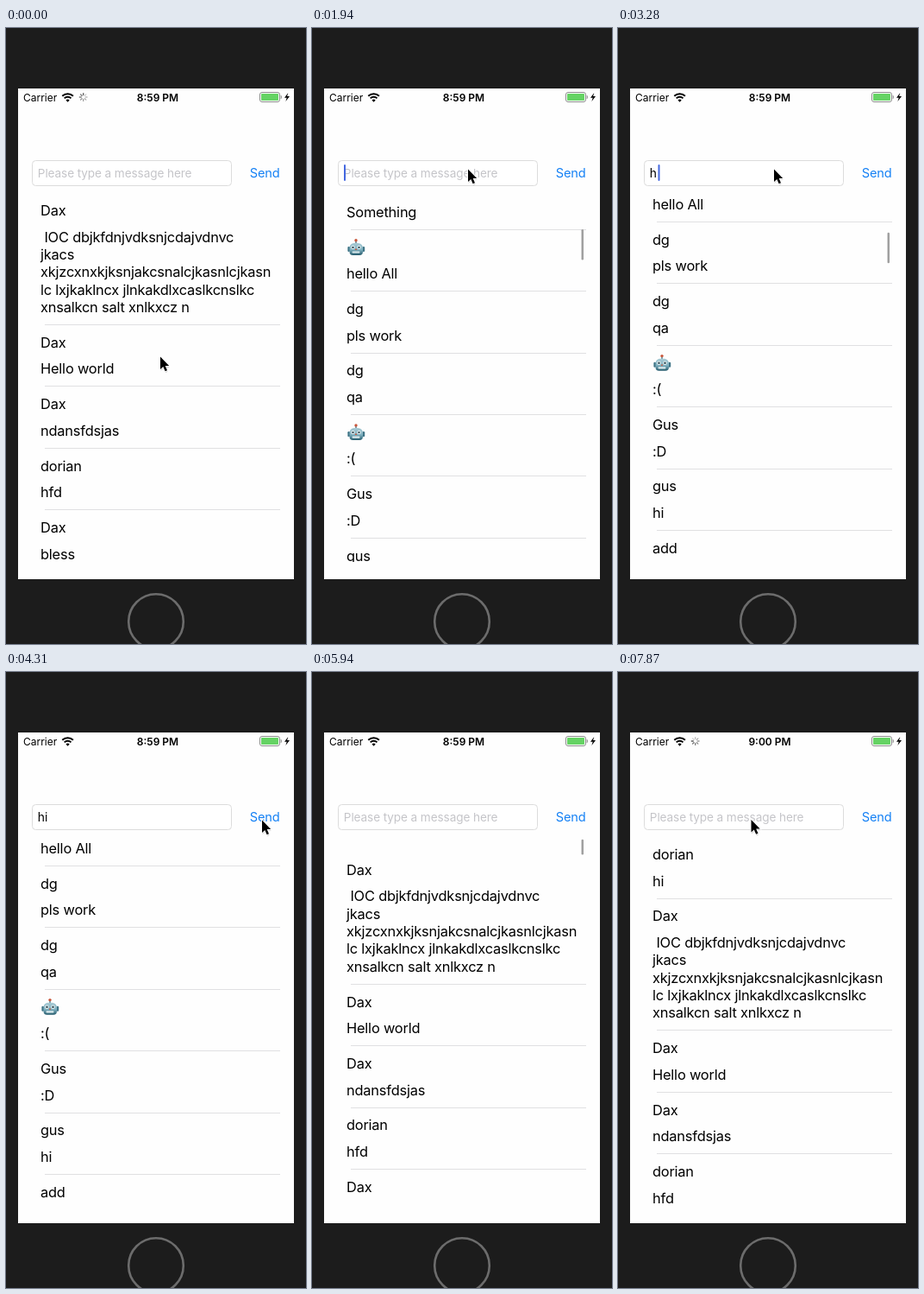
An HTML page that plays this animation: 348 px wide and 713 px high, repeating every 8 s.

```html
<!DOCTYPE html>
<html lang="en">
<head>
<meta charset="utf-8">
<title>Chat list</title>
<style>
  html, body { margin: 0; width: 100%; height: 100%; overflow: hidden; background: #1c1c1c; }
  svg { display: block; width: 348px; height: 713px; }
  text { font-family: Inter, Roboto, "Liberation Sans", sans-serif; white-space: pre; }
  .row { font-size: 16.4px; letter-spacing: -0.2px; }
  .bar { font-size: 12px; }
  .hint { font-size: 13.6px; letter-spacing: -0.1px; fill: #c5c5c9; }
  .typed { font-size: 13.8px; }
  .send { font-size: 14.6px; letter-spacing: -0.1px; fill: #1480f5; }
</style>
</head>
<body>
<svg viewBox="0 0 348 713">
  <defs>
    <clipPath id="view"><rect x="14" y="191" width="320" height="427"/></clipPath>
    <linearGradient id="steel" x2="0" y2="1">
      <stop offset="0" stop-color="#a9cbd5"/>
      <stop offset="0.55" stop-color="#7fb0bf"/>
      <stop offset="1" stop-color="#245a6c"/>
    </linearGradient>
    <g id="robot">
      <path d="M10 2v4" stroke="#5f8794" stroke-width="1.6"/>
      <circle cx="10" cy="1.8" r="1.7" fill="#c9573c"/>
      <rect x="0.4" y="9" width="2.6" height="6" rx="1.2" fill="#3f7486"/>
      <rect x="17.6" y="9" width="2.6" height="6" rx="1.2" fill="#3f7486"/>
      <path d="M7 5h6q5 1 5 6v4q0 4-4 4H6.500q-4 0-4-4v-4q0-5 4.500-6z" fill="url(#steel)"/>
      <circle cx="6.500" cy="10" r="2.200" fill="#eef6f7"/>
      <circle cx="13.500" cy="10" r="2.200" fill="#eef6f7"/>
      <circle cx="6.500" cy="10" r="1.200" fill="#2b4651"/>
      <circle cx="13.500" cy="10" r="1.200" fill="#2b4651"/>
      <path d="M10 11l1.200 2H8.800z" fill="#d9502f"/>
      <rect x="5.500" y="14.500" width="9" height="2.200" rx="1" fill="#dcebee"/>
    </g>
    <path id="tip" d="M0 0V14.500L3.300 11.400L5.600 16.800L8 15.800L5.700 10.500H10.200Z"/>
  </defs>

  <rect width="348" height="713" fill="#1c1c1c"/>
  <circle cx="174" cy="687" r="31.800" fill="none" stroke="#6c6c6c" stroke-width="2.600"/>
  <rect x="14" y="70" width="320" height="568" fill="#fefefe"/>

  <text class="bar" x="20" y="84.500">Carrier</text>
  <g fill="none" stroke="#000" stroke-width="2">
    <path d="M65.300 78.800a9 9 0 0 1 12.600 0M67.700 81.400a5.600 5.600 0 0 1 7.800 0"/>
    <path d="M71.600 85.800l-2.100-2.200a3 3 0 0 1 4.200 0z" fill="#000" stroke="none"/>
  </g>
  <g id="spin" transform="translate(89.700 80)" stroke="#5c5c5c" stroke-width="1.300" stroke-linecap="round"></g>
  <text class="bar" id="clock" x="176" y="84.500" font-weight="600" text-anchor="middle"></text>
  <rect x="294.500" y="74.500" width="23" height="11" rx="2.500" fill="none" stroke="#8d8d8d"/>
  <rect x="296" y="76" width="20" height="8" rx="1" fill="#65d364"/>
  <path d="M319 78.200q1.500 1.800 0 3.600z" fill="#8d8d8d" stroke="#8d8d8d" stroke-width="0.600"/>
  <path d="M327.300 75l-4.300 5.700h2.700l-1.300 4.300 4.600-6h-2.900z"/>

  <rect x="30.500" y="153.500" width="231" height="29" rx="4" fill="#fff" stroke="#dcdcdc"/>
  <text class="hint" id="hint" x="36.800" y="172.500">Please type a message here</text>
  <text class="typed" id="typed" x="36.800" y="172.500"></text>
  <rect id="caret" y="158" width="2" height="19" rx="1" fill="#4468e0"/>
  <text class="send" id="send" x="317.700" y="172.500" text-anchor="end">Send</text>

  <g clip-path="url(#view)">
    <g id="list" class="row"></g>
    <rect id="thumb" x="312.500" width="2.500" rx="1.250" fill="#a0a0a0"/>
  </g>

  <g id="arrow">
    <use href="#tip" x="0.500" y="1.800" opacity="0.200"/>
    <use href="#tip" stroke="#fff" stroke-width="1.800" paint-order="stroke"/>
  </g>
</svg>
<script>
const LOOP = 8000, TOP = 190.7, ROW = 71.4, LINE = 20.35;
const NS = "http://www.w3.org/2000/svg";
const $ = id => document.getElementById(id);

function add(parent, tag, attrs, text) {
  const el = document.createElementNS(NS, tag);
  for (const k in attrs) el.setAttribute(k, attrs[k]);
  if (text) el.textContent = text;
  return parent.appendChild(el);
}

// "@" stands for the robot face
const messages = [
  ["dorian", "hi"],
  ["Dax", " IOC dbjkfdnjvdksnjcdajvdnvc\njkacs\nxkjzcxnxkjksnjakcsnalcjkasnlcjkasn\nlc lxjkaklncx jlnkakdlxcaslkcnslkc\nxnsalkcn salt xnlkxcz n"],
  ["Dax", "Hello world"], ["Dax", "ndansfdsjas"], ["dorian", "hfd"],
  ["Dax", "bless"], ["Dax", "hello"], ["Dax", "Hllo world"],
  ["Dax", "fiajfsdv"], ["Dax", "hello world"], ["Dax", "dkasnida"],
  ["Dax", "Something"], ["@", "hello All"], ["dg", "pls work"],
  ["dg", "qa"], ["@", ":("], ["Gus", ":D"], ["gus", "hi"],
  ["add", "hi"], ["add", "test"]
];

const rows = messages.map(([name, body]) => {
  const g = add($("list"), "g", {});
  const lines = body.split("\n");
  if (name === "@") add(g, "use", { href: "#robot", x: 41, y: 10.5 });
  else add(g, "text", { x: 40, y: 26.3 }, name);
  lines.forEach((s, i) => add(g, "text", { x: 40, y: 56.9 + i * LINE }, s));
  const rule = add(g, "rect", { x: 45, width: 273, height: 1, fill: "#e0e0e2" });
  return { g, rule, h: ROW + (lines.length - 1) * LINE };
});

const petals = Array.from({ length: 8 }, (_, i) =>
  add($("spin"), "path", { d: "M0-2.400V-4.400", transform: `rotate(${i * 45})` }));

// The screen refreshes in bursts: [first, last, steps]
const bursts = [[0, 150, 2], [450, 450, 1], [750, 1350, 5], [1790, 1940, 2],
  [2240, 3280, 8], [3430, 3570, 2], [3870, 4310, 4], [4610, 5640, 8],
  [5790, 6830, 8], [6980, 7870, 7]];
const ticks = bursts.flatMap(([a, b, n]) =>
  Array.from({ length: n }, (_, i) => Math.floor((a + (b - a) * i / Math.max(1, n - 1)) / 10) * 10));

// Pointer path: [time, x, y]
const path = [[0, 179, 380.5], [449, 179, 380.5], [450, 179, 384], [700, 179, 384],
  [1000, 180, 320], [1350, 181, 163.5], [3750, 181, 163.5], [4020, 310, 184],
  [4160, 328, 181], [4310, 297, 171.5], [4610, 297, 171.5], [4910, 220, 245],
  [5100, 200, 300], [7200, 175, 250], [7580, 154.5, 171], [8000, 154.5, 171]];

function pointer(t) {
  const i = Math.max(1, path.findIndex(p => p[0] > t));
  const [a, b] = [path[i - 1], path[i]];
  const k = (t - a[0]) / (b[0] - a[0]);
  return [a[1] + (b[1] - a[1]) * k, a[2] + (b[2] - a[2]) * k];
}

// Drag, fling with decay, then a fling back to the top with a bounce
function scrollAt(t) {
  const end = 904.4;
  if (t < 700) return 0;
  if (t < 1000) return 36 * ((t - 700) / 300) ** 2;
  if (t < 3250) return end - 80.3 * Math.exp((1940 - t) / 394.6);
  if (t < 4950) return end;
  if (t < 5200) return end - 67 * ((t - 4950) / 250) ** 2;
  if (t < 5840) return 554 - 876.4 * (1 - Math.exp((5340 - t) / 500));
  const d = t - 5840;
  return d > 500 ? 0 : -0.645 * d * Math.exp(-0.01316 * d);
}

function thumbAlpha(t) {
  if (t < 750 || (t >= 3570 && t < 4900) || t >= 6500) return 0;
  return (t >= 3430 && t < 3570) || t >= 6350 ? 0.5 : 1;
}

const show = (id, on) => $(id).setAttribute("opacity", +on);
const put = (id, text) => { if ($(id).textContent !== text) $(id).textContent = text; };

function draw(t) {
  const scroll = scrollAt(t);
  let y = TOP - scroll;
  rows.forEach(({ g, rule, h }, i) => {
    const on = i > 0 || t >= 7100;
    g.setAttribute("visibility", on ? "visible" : "hidden");
    if (!on) return;
    g.setAttribute("transform", `translate(0 ${y})`);
    rule.setAttribute("y", Math.floor(y + h) - y);
    y += h;
  });

  $("thumb").setAttribute("y", 193 + 0.0485 * Math.max(0, scroll) + (scroll < 0 ? 0.8 : 0));
  $("thumb").setAttribute("height", 35.5 + Math.min(0, scroll));
  show("thumb", thumbAlpha(t));

  const typed = t >= 4750 || t < 3280 ? "" : t < 3430 ? "h" : "hi";
  put("typed", typed);
  show("hint", !typed);
  $("caret").setAttribute("x", 37 + [0, 9.5, 12][typed.length]);
  show("caret", t >= 1790 && t < 3570);
  show("send", t >= 4610 && t < 4750 ? 0.3 : 1);

  put("clock", t < 6980 ? "8:59 PM" : "9:00 PM");
  show("spin", t < 150 || (t >= 4610 && t < 5150) || t >= 6200);
  const lead = Math.floor(t / 100) % 8;
  petals.forEach((p, i) => p.setAttribute("opacity", 1 - 0.1 * ((lead - i + 8) % 8)));

  const [px, py] = pointer(t);
  $("arrow").setAttribute("transform", `translate(${px} ${py})`);
  show("arrow", t < 5150 || t >= 7250);
}

let last = -1;
function frame() {
  const now = performance.now() % LOOP;
  const t = ticks.filter(k => k <= now).pop();
  if (t !== last) draw(last = t);
  requestAnimationFrame(frame);
}
frame();
</script>
</body>
</html>
```
